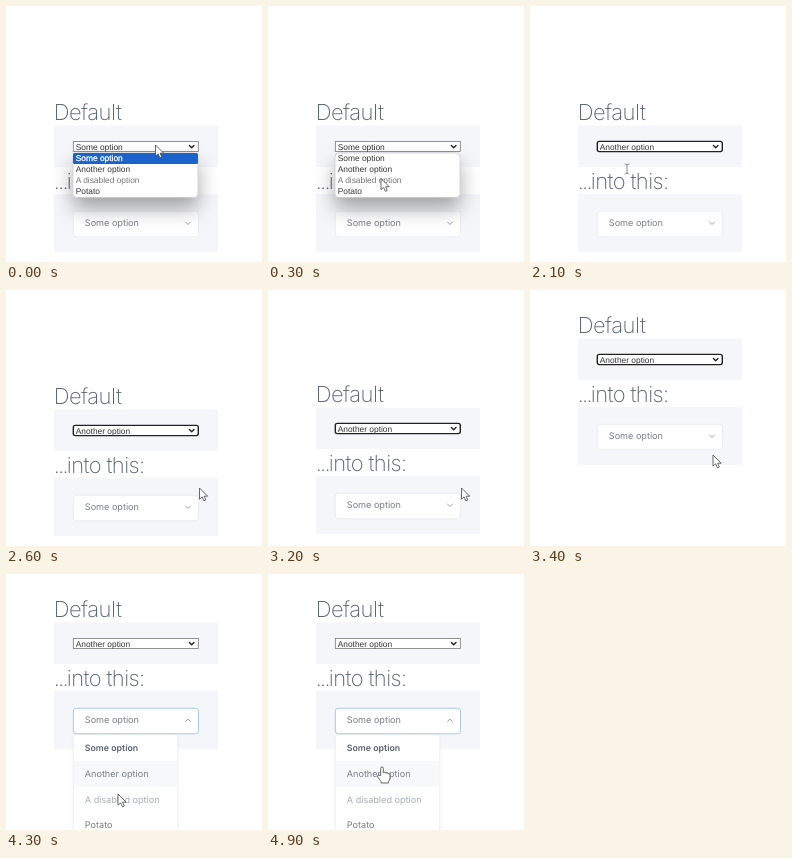
These frames come from a looping animation (256x256 px, 5000 ms). An HTML page:

```html
<!DOCTYPE html>
<html lang="en">
<head>
<meta charset="utf-8">
<title>Select styling</title>
<style>
  html, body { margin: 0; width: 100%; height: 100%; overflow: hidden; background: #fff; }
  svg { display: block; width: 100vw; height: 100vh; }
  text { text-rendering: geometricPrecision; white-space: pre; }
  .title { font: 200 22px Inter, sans-serif; fill: #55606e; }
  .native { font: 8.4px "Liberation Sans", Arial, sans-serif; fill: #333; }
  .custom { font: 400 9.1px Inter, sans-serif; fill: #777c87; }
  .panel { fill: #f5f6fa; }
  .line { fill: none; stroke-linecap: round; stroke-linejoin: round; }
  .cursor { fill: #fff; stroke: #444; stroke-width: .8; stroke-linejoin: round; }
  .off { display: none; }
</style>
</head>
<body>
<svg viewBox="0 0 256 256">
  <defs>
    <filter id="deep" x="-40%" y="-60%" width="180%" height="260%">
      <feDropShadow dx="0" dy="11" stdDeviation="10" flood-color="#000" flood-opacity=".34"/>
    </filter>
    <filter id="soft" x="-20%" y="-20%" width="140%" height="140%">
      <feDropShadow dx="0" dy="1" stdDeviation="1.2" flood-color="#44587a" flood-opacity=".12"/>
    </filter>
  </defs>

  <g id="page">
    <text class="title" x="47.7" y="114" letter-spacing="-.5">Default</text>
    <rect class="panel" x="48" y="119.5" width="164" height="41.5"/>
    <rect id="field" x="67.3" y="135.4" width="125" height="10.2" fill="#fff"/>
    <text id="value" class="native" x="69.7" y="143.6"></text>
    <path class="line" d="M183.4 139.4l2.3 2.3 2.3-2.3" stroke="#222" stroke-width="1.4"/>

    <text class="title" x="47.7" y="183" letter-spacing="-.6"><tspan letter-spacing="-1.7">...</tspan>into this:</text>
    <rect class="panel" x="48" y="188" width="164" height="58"/>
    <g id="list" filter="url(#soft)">
      <rect x="67.5" y="231.5" width="104" height="105" rx="3" fill="#fff" stroke="#eef0f4" stroke-width=".6"/>
      <rect id="hover" x="68" y="258" width="103.2" height="25.6" fill="#f7f8fa"/>
    </g>
    <rect id="box" x="67.3" y="205.2" width="125.2" height="25.6" rx="3" fill="#fff"/>
    <text class="custom" x="78.8" y="220.3">Some option</text>
    <path id="arrow" class="line" d="M-2.4-1.2L0 1.2 2.4-1.2" stroke="#8d949f" stroke-width=".9"/>
  </g>

  <g id="menu">
    <rect x="67" y="147" width="125" height="44.5" rx="4" fill="#fff" stroke="#aaa" stroke-width=".5" filter="url(#deep)"/>
    <rect id="bar" x="67" width="125" height="11" rx="1.5" fill="#1b63cb"/>
  </g>

  <g id="pointer">
    <path class="cursor" d="M0 0V11.2L2.6 8.8 4.4 12.9 6.3 12 4.6 8.2H8.2Z"/>
    <path class="cursor" d="M-1.3 8.5V1.2Q-1.3 0 0 0T1.3 1.2V5.5Q3.3 4.6 3.8 6 5.6 5.3 6.1 6.8 8 6.3 8 8.2V11Q8 13.2 6.4 14.4V16H-.8V14.6L-4.4 9.8Q-4.8 8 -3.2 8.2Z"/>
    <path class="line" d="M-2-5Q0-5 0-3.8 0-5 2-5M0-4V4M-2 5Q0 5 0 3.8 0 5 2 5" stroke="#777" stroke-width=".8"/>
  </g>
</svg>

<script>
const LOOP = 5000, STEP = 100;
const ARROW = 0, HAND = 1, BEAM = 2;
const options = ["Some option", "Another option", "A disabled option", "Potato"];
const $ = id => document.getElementById(id);

// time, x, y, pointer shape
const path = [
  [0, 149.5, 139, ARROW], [200, 125, 160, ARROW], [400, 101, 185, ARROW],
  [600, 96, 162, ARROW], [2100, 97, 163, BEAM], [2200, 112, 172, BEAM],
  [2300, 139, 184, ARROW], [2500, 188, 196, ARROW], [2600, 193.5, 198, ARROW],
  [3200, 193.5, 198, ARROW], [3400, 183, 165, ARROW], [3500, 165, 154, HAND],
  [3700, 131, 146, HAND], [3800, 127.5, 144.5, HAND], [3900, 127.5, 144.5, HAND],
  [4100, 120, 175, HAND], [4200, 115, 203, HAND], [4300, 112, 220, ARROW],
  [4600, 112, 219.5, ARROW], [4800, 113, 205, HAND], [4900, 114, 193, HAND]
];
const scroll = [[0, 0], [3100, 0], [3200, -2], [3300, -38], [3400, -71]];
const opening = [[0, 0], [3800, 0], [4000, 1]];

function at(keys, t) {
  const i = keys.findLastIndex(k => k[0] <= t);
  const a = keys[i], b = keys[i + 1];
  if (!b) return a;
  const p = (t - a[0]) / (b[0] - a[0]);
  return a.map((v, n) => v + (b[n] - v) * p);
}

function addText(parent, label, cls, x, y) {
  const el = document.createElementNS("http://www.w3.org/2000/svg", "text");
  el.textContent = label;
  el.setAttribute("class", cls);
  el.setAttribute("x", x);
  el.setAttribute("y", y);
  parent.append(el);
  return el;
}

const menuTexts = options.map((o, i) => addText($("menu"), o, "native", 69.7, 155 + 11 * i));
const listTexts = options.map((o, i) => addText($("list"), o, "custom", 78.8, 248.1 + 25.7 * i));
listTexts[0].style.cssText = "font-weight:600;font-size:8.8px;fill:#5a6270";
listTexts[2].style.fill = "#a6abb6";

const show = (el, on) => el.classList.toggle("off", !on);

function set(el, attrs) {
  for (const name in attrs) el.setAttribute(name, attrs[name]);
}

function render(t) {
  const [, x, y] = at(path, t);
  const shape = path.findLast(k => k[0] <= t)[3];
  const dy = at(scroll, t)[1];
  const open = at(opening, t)[1];
  const focused = t >= 2100 && t < 3700;

  set($("pointer"), { transform: `translate(${x} ${y})` });
  [...$("pointer").children].forEach((el, i) => show(el, i === shape));
  set($("page"), { transform: `translate(0 ${dy})` });

  // native select
  const row = Math.max(0, Math.min(3, Math.floor((y - 147) / 11)));
  show($("menu"), t < 2100);
  show($("bar"), row !== 2);
  set($("bar"), { y: 147 + 11 * row });
  menuTexts.forEach((el, i) => {
    const lit = i === row && i !== 2;
    el.style.cssText = lit ? "fill:#fff;stroke:#fff;stroke-width:.3" : i === 2 ? "fill:#737373" : "";
  });
  $("value").textContent = options[t < 2100 ? 0 : 1];
  set($("field"), focused
    ? { stroke: "#222", "stroke-width": 1.4, rx: 2 }
    : { stroke: "#777", "stroke-width": .8, rx: 0 });

  // custom select
  const scale = .85 + .15 * open;
  show($("list"), open > 0);
  show($("hover"), t >= 4200);
  set($("list"), {
    opacity: open,
    transform: `translate(119.5 231) scale(${scale}) translate(-119.5 -231)`
  });
  set($("box"), { stroke: open ? "#9cc8d6" : "#e3e6ec", "stroke-width": open ? .9 : .7 });
  set($("arrow"), { transform: `translate(182 217.3) rotate(${180 * open})` });
}

const start = performance.now();
function tick() {
  const t = (performance.now() - start) % LOOP;
  render(Math.floor(t / STEP) * STEP);
  requestAnimationFrame(tick);
}
tick();
</script>
</body>
</html>
```
